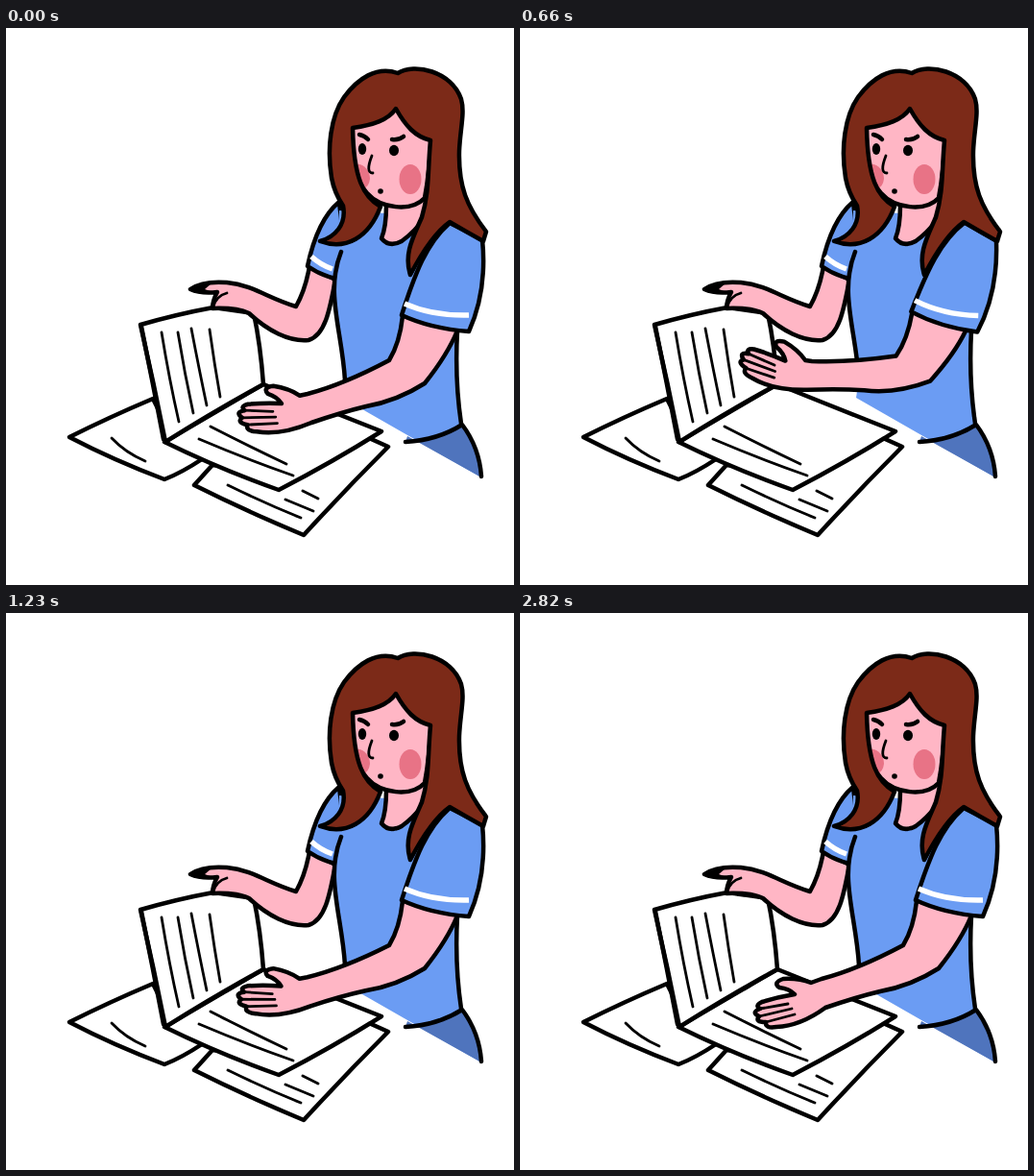
These frames come from a looping animation (529 px wide and 580 px high, 2.85 s). An HTML page:

```html
<!DOCTYPE html>
<html lang="en">
<head>
<meta charset="utf-8">
<title>Reading at the desk</title>
<style>
  html, body { margin: 0; width: 100%; height: 100%; overflow: hidden; background: #fff; }
  svg { display: block; width: 100vw; height: 100vh; }
  path, ellipse { stroke: #000; stroke-width: 4.5; stroke-linecap: round; stroke-linejoin: round; fill: none; }
  .paper { fill: #fff; }
  .skin { fill: #ffb6c5; }
  .shirt { fill: #6b9cf3; }
  .hair { fill: #7c2a18; }
  .skirt { fill: #4f74bd; }
  .cheek { fill: #e87386; }
  .plain { stroke: none; }
  .fine { stroke-width: 2.8; }
  .stripe { stroke: #fff; stroke-width: 5.5; stroke-linecap: butt; }
  .ink { fill: #000; stroke: none; }
</style>
</head>
<body>
<svg viewBox="0 0 529 580">
  <!-- loose sheets -->
  <path class="paper" d="M153 386Q108 405 66 426Q112 450 165 470Q183 463 204 449L170 420Z"/>
  <path class="fine" d="M110 427Q124 442 145 451"/>
  <path class="paper" d="M215 455L196 476Q250 503 310 528Q354 480 398 436L378 427L284 460Z"/>
  <path class="fine" d="M231 476Q270 495 307 510M291 491L320 503M309 482L325 490"/>

  <!-- open booklet -->
  <path class="paper" d="M268 371Q330 396 391 420Q340 452 284 481Q222 459 165 431Z"/>
  <path class="paper" d="M140 309Q178 298 216 291L258 297Q265 330 268 371Q215 400 166 431Q154 370 140 309Z"/>
  <path d="M141 311Q153 370 164 428" stroke-width="5"/>
  <path class="fine" d="M162 317Q170 366 180 410M179 317Q186 360 195 401M193 313Q201 355 209 393M212 314Q217 350 223 384"/>
  <path class="fine" d="M213 415Q250 434 292 454M201 428Q248 448 299 466"/>

  <!-- far arm -->
  <path class="skin" d="M316 248Q312 272 302 290C272 281 258 268 230 265Q205 263 192 272Q203 277 220 275Q215 284 215 292Q240 291 253 297C272 315 295 327 315 325C332 320 337 295 343 262Z"/>
  <path class="fine" d="M230 276Q219 279 216 290"/>
  <path class="ink" d="M190 272Q202 264 214 266L207 272L218 276Q200 279 190 272Z"/>
  <path class="shirt" d="M347 181C330 195 320 220 314 248Q327 257 343 261L352 225Z"/>
  <path class="stripe" d="M318 238Q328 247 340 251"/>

  <!-- torso and skirt -->
  <path class="shirt plain" d="M347 190L430 195L470 215L470 315C468 350 470 385 475 413L495 468L350 385L353 365C350 325 333 275 345 235Z"/>
  <path class="skirt plain" d="M416 431Q448 428 475 413Q493 437 495 468L418 425Z"/>
  <path d="M349 233C332 275 350 315 353 367M470 315C468 350 470 385 474 412M416 431Q450 429 475 413Q493 437 495 467"/>

  <!-- neck and face -->
  <path class="skin" d="M396 184Q396 207 391 219Q399 229 412 222Q426 212 438 195L439 172Z"/>
  <path class="skin" d="M361 98C360 140 363 158 376 172C390 188 422 192 436 177Q441 150 443 112L406 78Z"/>
  <path class="cheek plain" d="M363 142C372 140 379 148 379 157Q378 166 371 168Q365 158 363 142Z"/>
  <ellipse class="cheek plain" cx="421" cy="157.500" rx="11.500" ry="15.500"/>
  <ellipse class="ink" cx="371" cy="126" rx="4.200" ry="6"/>
  <ellipse class="ink" cx="404" cy="127.500" rx="5" ry="5.800"/>
  <ellipse class="ink" cx="390" cy="170" rx="2.800" ry="2.800"/>
  <path d="M368 111Q373 112 377 116M402 116Q409 117 414 113" stroke-width="5"/>
  <path class="fine" d="M381 133Q374 151 382 151"/>

  <!-- near arm -->
  <path id="arm" class="skin"/>
  <path id="fingers" class="fine"/>
  <path id="sleeve" class="shirt"/>
  <path id="stripe" class="stripe"/>

  <!-- hair -->
  <path class="hair" d="M408 47C386 39 366 53 352 72C338 92 334 125 339 156Q342 172 351 185C355 205 342 218 327 222C354 232 378 218 390 186C372 176 362 156 361 104C382 101 398 96 406 84C416 102 426 113 442 117C439 150 441 170 433 197C424 218 414 235 421 257C432 236 445 214 462 202Q479 212 497 222L500 212C480 186 471 165 472 128C473 105 478 88 474 74C464 45 425 36 408 47Z"/>
</svg>
<script>
const LOOP = 2850, STEP = 30;
const SHOULDER = [470, 220], ELBOW = [415, 360], WRIST = [315, 398];

// time, then absolute rotation of upper arm, forearm and hand in degrees
const KEYS = [
  [0, 0, 0, 12],
  [420, 4, 17, 27],
  [900, 2, 13, 35],
  [1230, 0, 1, 13.5],
  [1470, 0, 0, 0],
  [LOOP, 0, 0, 0]
];

const slope = (i, c) => {
  if (i < 1 || i > KEYS.length - 3) return 0;
  const a = KEYS[i - 1], b = KEYS[i + 1];
  return (b[c] - a[c]) / (b[0] - a[0]);
};

// cubic Hermite interpolation of one channel
function angleAt(t, c) {
  let i = 0;
  while (i < KEYS.length - 2 && t >= KEYS[i + 1][0]) i++;
  const a = KEYS[i], b = KEYS[i + 1], h = b[0] - a[0], u = (t - a[0]) / h, v = 1 - u;
  return v * v * (1 + 2 * u) * a[c] + u * u * (3 - 2 * u) * b[c]
    + h * u * v * (v * slope(i, c) - u * slope(i + 1, c));
}

// rotates points around a rest joint that has moved to a new place
function bone(joint, place, degrees) {
  const r = degrees * Math.PI / 180, cos = Math.cos(r), sin = Math.sin(r);
  return (x, y) => {
    const dx = x - joint[0], dy = y - joint[1];
    return [place[0] + dx * cos - dy * sin, place[1] + dx * sin + dy * cos];
  };
}

const setPath = (id, d) => document.getElementById(id).setAttribute('d', d);

function draw(t) {
  const U = bone(SHOULDER, SHOULDER, angleAt(t, 1));
  const F = bone(ELBOW, U(...ELBOW), angleAt(t, 2));
  const H = bone(WRIST, F(...WRIST), angleAt(t, 3));

  setPath('arm', `M${U(413, 300)}Q${U(410, 328)} ${U(399, 346)}
    Q${F(352, 371)} ${F(314, 381)}L${H(303, 385)}
    Q${H(290, 380)} ${H(274, 381)}Q${H(263, 385)} ${H(270, 390)}
    Q${H(280, 391)} ${H(286, 397)}Q${H(268, 400)} ${H(252, 405)}
    Q${H(244, 409)} ${H(250, 412)}Q${H(240, 416)} ${H(249, 420)}
    Q${H(244, 426)} ${H(256, 426)}Q${H(255, 433)} ${H(267, 431)}
    Q${H(292, 430)} ${F(318, 411)}Q${F(350, 400)} ${F(375, 394)}
    Q${F(408, 388)} ${U(436, 370)}Q${U(460, 340)} ${U(470, 315)}`);
  setPath('fingers', `M${H(250, 412)}L${H(279, 407)}
    M${H(249, 420)}L${H(283, 412)}M${H(256, 426)}L${H(286, 418)}`);
  setPath('sleeve', `M${U(462, 203)}C${U(438, 224)} ${U(426, 255)} ${U(412, 299)}
    Q${U(442, 313)} ${U(482, 316)}C${U(496, 285)} ${U(499, 250)} ${U(496, 220)}Z`);
  setPath('stripe', `M${U(415, 287)}Q${U(444, 300)} ${U(482, 299)}`);
}

function tick(now) {
  draw(Math.floor(now % LOOP / STEP) * STEP);
  requestAnimationFrame(tick);
}
draw(0);
requestAnimationFrame(tick);
</script>
</body>
</html>
```
